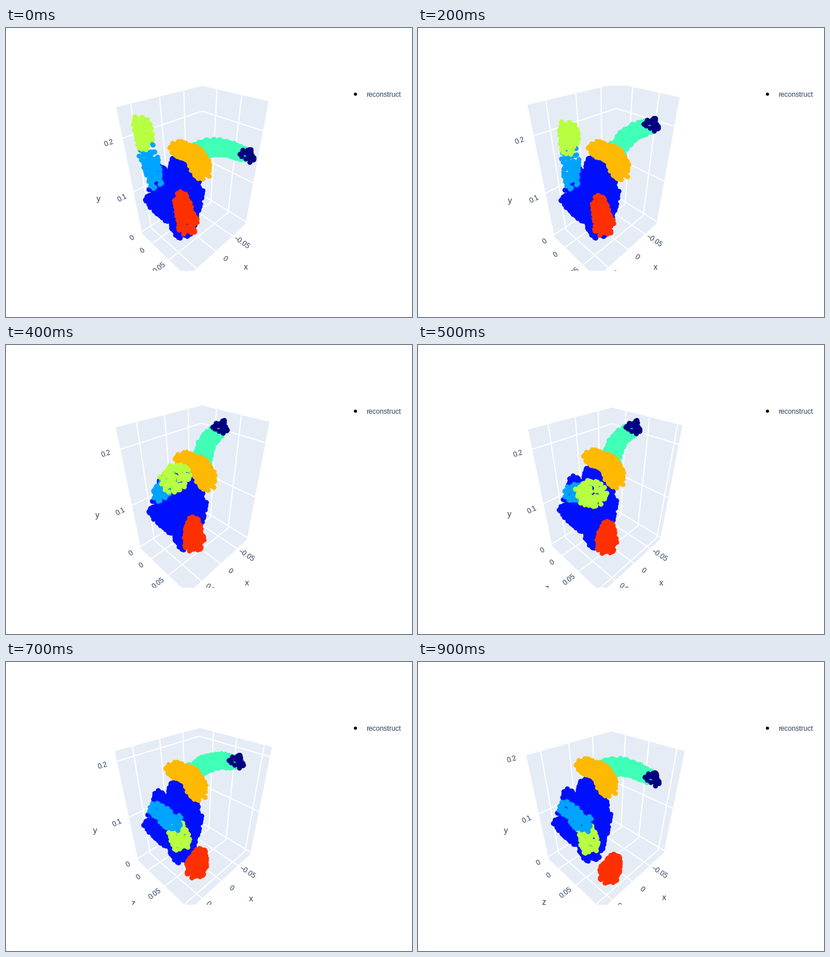
A matplotlib script that plays this animation: 700x500 px, repeating every 1 s.

```python
import numpy as np
import matplotlib.pyplot as plt
from matplotlib.animation import FuncAnimation
from matplotlib.lines import Line2D

W, H, STEPS = 700, 500, 10
PT = 0.72  # points per pixel at 100 dpi
INK, PANEL = "#2a3f5f", "#e5ecf6"
NAVY, BLUE, SKY, TEAL = "#000080", "#0010ff", "#00a4ff", "#40ffb7"
LIME, ORANGE, RED = "#b7ff40", "#ffb900", "#ff3000"
FONT = "Liberation Sans"
LEFT, RIGHT, TOP, BOTTOM = 80, 572, 100, 420
FOCAL, EYE = 385.5, 1.25 * np.sqrt(3)
TICK_GAP, TITLE_GAP = 0.121, 0.329
CORE = (-0.003, 0.06, -0.009)  # data point the body is fixed to


def wave(t, mean, swing, peak):
    return mean + swing * np.cos(2 * np.pi * (t - peak) / STEPS)


def ease(t, start, end):
    p = np.clip((t - start) / (end - start), 0, 1)
    return p * p * (3 - 2 * p)


def vec(x, y):
    return np.array([x, y], float)


def axis_ranges(t):
    """Limits of x, y and z: raised arm or tail sets the top, shin the front."""
    arm_top, tail_top = 0.245 - 0.0002 * t ** 4, 0.231 - 0.0018 * (t - 4) ** 2
    front = 0.083 + 0.0295 * ease(t, 2, 6) + 0.0033 * max(2 - t, 0) ** 2
    return np.array([
        (wave(t, -0.0895, 0.0065, 4), wave(t, 0.0772, 0.0052, 4.8)),
        (-0.0063, max(arm_top, tail_top, 0.201)),
        (-0.0333, front)])


def project(u, v, h):
    """u runs right and near (z), v left and near (x), h up (y)."""
    depth = EYE - (u + v + h) / np.sqrt(3)
    return vec(326 + FOCAL * (u - v) / np.sqrt(2) / depth,
               260 - FOCAL * (2 * h - u - v) / np.sqrt(6) / depth)


def box_scale(ranges):
    return np.prod(np.ptp(ranges, axis=1)) ** (-1 / 3)


def core_at(t):
    ranges = axis_ranges(t)
    x, y, z = (CORE - ranges.mean(axis=1)) * box_scale(ranges)
    return project(z, x, y)


def ticks(low, high, spacing, scale):
    """Pairs of tick value and its position on an axis centred on zero."""
    first, last = int(np.ceil(low / spacing)), int(np.floor(high / spacing))
    return [(n * spacing, (n * spacing - (low + high) / 2) * scale)
            for n in range(first, last + 1)]


def grid_line(*points):
    scene.plot(*np.array([project(*p) for p in points]).T, color="white", lw=2 * PT, zorder=1)


def label(text, xy, size=12, angle=0):
    scene.text(*xy, text, fontsize=size * PT, family=FONT, color=INK, rotation=angle,
               ha="center", va="center", clip_on=True)


def tick_label(value, anchor, toward):
    start, end = project(*anchor), project(*toward)
    dx, dy = end - start
    if dx < 0:
        dx, dy = -dx, -dy
    label(f"{value:g}".replace("-", "\u2212"), end + vec(0, 1),
          angle=-np.degrees(np.arctan2(dy, dx)))


def draw_box(t):
    ranges = axis_ranges(t)
    scale = box_scale(ranges)
    c, b, a = np.ptp(ranges, axis=1) * scale / 2
    hull = [(-a, c, b), (-a, -c, b), (a, -c, b), (a, -c, -b), (a, c, -b), (-a, c, -b)]
    scene.fill(*np.array([project(*p) for p in hull]).T, color=PANEL, lw=0, zorder=0)

    for value, v in ticks(*ranges[0], 0.05, scale):
        grid_line((-a, v, b), (-a, v, -b), (a, v, -b))
        tick_label(value, (a, v, -b), (a + TICK_GAP, v, -b))
    for value, h in ticks(*ranges[1], 0.1, scale):
        grid_line((-a, c, h), (-a, -c, h), (a, -c, h))
        tick_label(value, (-a, c, h), (-a, c + TICK_GAP, h))
    for value, u in ticks(*ranges[2], 0.05, scale):
        grid_line((u, -c, b), (u, -c, -b), (u, c, -b))
        tick_label(value, (u, c, -b), (u, c + TICK_GAP, -b))

    label("x", project(a + TITLE_GAP, 0, -b), 14)
    label("y", project(-a, c + TITLE_GAP, 0), 14)
    label("z", project(0, c + TITLE_GAP, -b), 14)


def limb(start, end, radii, color, count, bend=(0, 0)):
    """Scatter dots in a rounded, tapered and possibly bent bar."""
    rng = np.random.RandomState(count)
    along, turn = rng.rand(count, 1), 2 * np.pi * rng.rand(count, 1)
    reach = rng.rand(count, 1) ** 0.4 * (radii[0] + (radii[1] - radii[0]) * along)
    spine = start + (end - start) * along + 4 * along * (1 - along) * np.array(bend)
    points = spine + reach * np.hstack([np.cos(turn), np.sin(turn)])
    scene.scatter(*points.T, s=(8.6 * PT) ** 2, color=color, linewidths=0, zorder=3)


def draw_torso(body):
    limb(body + vec(298, 232), body + vec(308, 285), (16, 34), BLUE, 700)
    limb(body + vec(304, 285), body + vec(304, 344), (36, 20), BLUE, 900)
    limb(body + vec(257, 293), body + vec(290, 318), (20, 22), BLUE, 400)
    limb(body + vec(264, 244), body + vec(272, 270), (8, 18), BLUE, 250)


def draw_tail(hip, t):
    pivot = hip + vec(330, 212)
    lift = wave(t, 25, 37, 4)
    angle = np.radians(lift)
    along, up = vec(np.cos(angle), -np.sin(angle)), vec(-np.sin(angle), -np.cos(angle))
    paw = pivot + along * wave(t, 78, 10, 9.5)
    limb(pivot, pivot + 0.9 * (paw - pivot), (16, 12), TEAL, 500, 9 * up)

    tilt = np.radians(0.35 * (37 - lift))
    axis = vec(np.cos(tilt), np.sin(tilt))
    limb(paw - 8 * axis, paw + 4 * axis, (8, 12), NAVY, 28)


def draw_shin(body, t):
    bend = ease(t, 0.3, 9.8)
    knee = body + vec(300, 292) + bend * vec(46, 70)
    foot = body + vec(313, 341) + bend ** 1.5 * vec(23, 45)
    limb(knee, foot, (11, 19), RED, 330)


def draw_arm(body, t):
    swing = ease(t, 1, 8)
    shoulder = body + vec(257, 268)
    elbow = body + vec(243 + 52 * swing ** 0.5, 212 + 88 * swing)
    hand = body + vec(233 + 70 * swing ** 0.5 + 17 * np.sin(np.pi * swing), 164 + 176 * swing)
    width = 16 + 7 * np.sin(np.pi * swing)

    upper = (shoulder, elbow, (12, 17), SKY, 115)
    fore = (elbow + 0.3 * (hand - elbow), hand, (width, width), LIME, 120)
    # the forearm passes behind the upper arm late in the swing
    for bar in (upper, fore) if t < 6 else (fore, upper):
        limb(*bar)


def draw(t):
    scene.clear()
    scene.set(xlim=(LEFT, RIGHT), ylim=(BOTTOM, TOP))
    scene.axis("off")
    draw_box(t)
    body = core_at(t) - core_at(0)
    hip = body + vec(wave(t, 0, 5, 2.5), -11 * ease(t, 0.3, 9.8) ** 2)
    draw_torso(body)
    draw_tail(hip, t)
    limb(hip + vec(294, 209), hip + vec(336, 246), (14, 18), ORANGE, 520, (7, -9))
    draw_shin(body, t)
    draw_arm(body, t)


fig = plt.figure(figsize=(W / 100, H / 100), dpi=100, facecolor="white")
scene = fig.add_axes([LEFT / W, 1 - BOTTOM / H, (RIGHT - LEFT) / W, (BOTTOM - TOP) / H])
fig.add_artist(Line2D([601.5 / W], [1 - 114 / H], marker="o", ms=5.5 * PT, mew=0, color="black"))
fig.text(621.3 / W, 1 - 119 / H, "reconstruct", fontsize=12 * PT, family=FONT, color=INK)

anim = FuncAnimation(fig, draw, frames=STEPS, interval=100, repeat=True)
plt.show()
```
